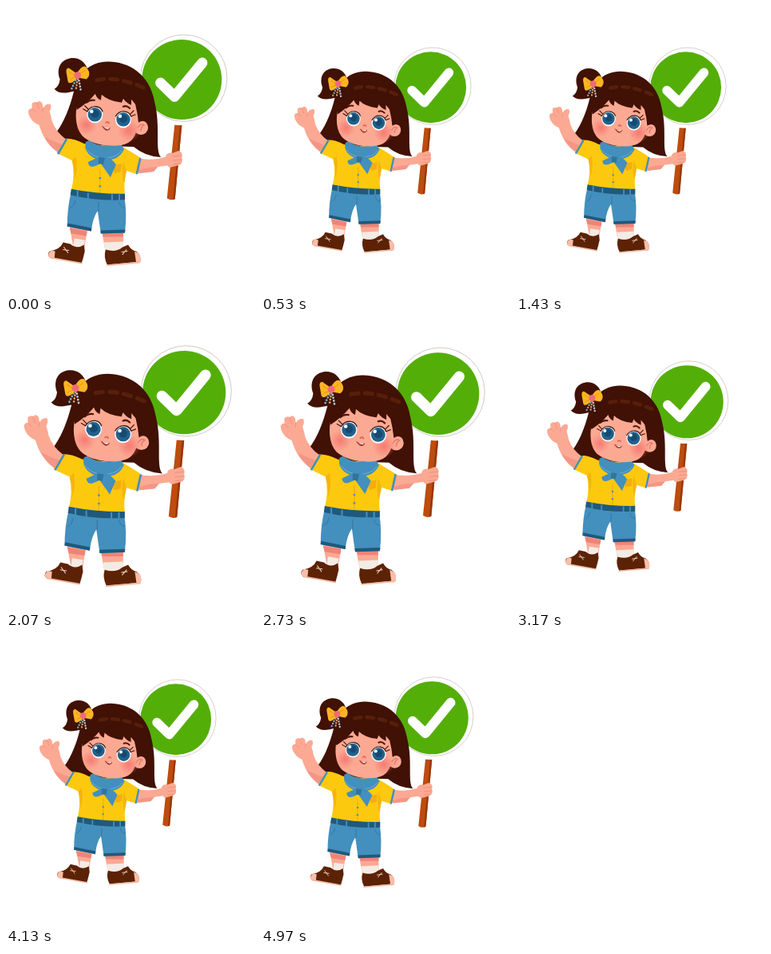
Recreate the animation shown at these times as an HTML page. Size 312x360 px, loop 5.01 s.

```html
<!DOCTYPE html>
<html lang="en">
<head>
<meta charset="utf-8">
<title>Girl with a check sign</title>
<style>
html, body { margin: 0; width: 100%; height: 100%; overflow: hidden; background: #fff; }
svg { display: block; width: 312px; height: 360px; }
.hair { fill: #401104; }
.skin { fill: #fba993; }
.shade { fill: #ee8478; }
.shirt { fill: #fdc90f; }
.fold { fill: #f5b40c; }
.blue { fill: #438fbd; }
.navy { fill: #1f597c; }
.shoe { fill: #5c2206; }
.line { fill: none; stroke-linecap: round; stroke-linejoin: round; }
</style>
</head>
<body>
<svg viewBox="0 0 312 360">
<defs>
  <radialGradient id="blush">
    <stop offset="0" stop-color="#f4736c" stop-opacity=".85"/>
    <stop offset="1" stop-color="#f4736c" stop-opacity="0"/>
  </radialGradient>
  <g id="eye">
    <ellipse rx="10" ry="10.5" fill="#fff"/>
    <circle r="8.7" fill="#22618c"/>
    <circle cy="-1" r="5" fill="#164a70"/>
    <circle cx="-4" cy="-4" r="2.2" fill="#fff"/>
    <path class="line" d="M-9.500-4Q-5-11 2-10Q8-9 9.500-4" stroke="#401104" stroke-width="1.300"/>
  </g>
</defs>
<g id="girl">
  <!-- sign -->
  <circle cx="222.500" cy="90.500" r="54" fill="#fff" stroke="#b5a79f" stroke-width=".6"/>
  <circle cx="220" cy="92.300" r="49.800" fill="#54ae08"/>
  <path class="line" d="M193.500 96.500 211 113.500 245.500 71.500" stroke="#fff" stroke-width="13"/>
  <path d="M211 149 220 149.500 211.500 241Q206 243.500 201.500 240Z" fill="#bd4c0f"/>
  <path d="M217.500 149.500h2.500l-8.500 91.500-2.500 1Z" fill="#97370b"/>

  <!-- back hair -->
  <path class="hair" d="M86 104C80 130 70 152 59 163Q70 171 94 174L160 176Q174 188 194 189C186 180 194 152 186 120C180 85 153 70 128 70C105 70 90 86 86 104Z"/>

  <!-- raised arm -->
  <path class="skin" d="M70 186C54 177 46 163 42 149C34 146 28 138 28.500 131Q31 127 33 129L33 122Q37 119 39 121Q43 117 46 122L47 128Q50 122 56 123Q58 127 55 132Q57 138 58 144Q63 158 76 167Z"/>
  <path class="line" d="M33 129 38 133M39 121 42 129M47 128 46 133" stroke="#f08c7d" stroke-width=".8"/>
  <path class="shade" d="M70 186C60 180 53 172 49 164Q62 170 73 174Z" opacity=".5"/>

  <!-- holding arm -->
  <path class="skin" d="M164 190Q184 194 202 188L204 199 190 201 185 207 166 209Z"/>
  <path class="shade" d="M166 209 185 207 190 201 178 202 166 205Z" opacity=".5"/>
  <path class="skin" d="M200 187Q203 182 208 184L216 181Q222 183 220 190Q222 197 216 199L205 202Q199 200 200 187Z"/>
  <path class="line" d="M209 188 219 187M209 193 220 192M209 198 217 197" stroke="#ea8a78" stroke-width=".8"/>

  <!-- legs and shoes -->
  <path class="skin" d="M80 275 102 279 98 305 85 303ZM120 280 147 280 147 308 125 308Z"/>
  <path class="shade" d="M80 277 102 281 101 287 82 284ZM121 283H147V288H122Z"/>
  <path d="M86 290 99 292 97 306 84 303ZM123 295 147 294 148 310 125 309Z" fill="#f4ebe4"/>
  <path class="shoe" d="M72 295 81 297Q89 304 98 298L99 306Q97 315 95 321L56 314Q51 311 55 306Q68 304 72 295Z"/>
  <path class="shoe" d="M125 304Q138 308 146 301L153 298Q157 305 163 306Q170 311 168 319L127 323Q122 313 125 304Z"/>
  <path d="M57 305 62 306 61 315 55 314Q51 310 57 305ZM161 306 167 309Q170 315 168 320L163 320Z" fill="#f9bda8"/>
  <path class="line" d="M56 314 95 321M127 323.500 167 320" stroke="#f3b9a0" stroke-width="1.800"/>
  <path class="line" d="M72 304 79 305M73 301 78 308M145 307 152 306M146 310 151 304" stroke="#f3d6c4" stroke-width="1"/>

  <!-- shorts -->
  <path class="blue" d="M82 232 148 236Q152 259 149 283L119 284 115 256Q109 264 107 281L77 275Q77 252 82 232Z"/>
  <path class="navy" d="M77.500 271 107.500 277 107 281 77 275ZM118.500 280 149.500 279 149 283 119 284Z"/>
  <path class="line" d="M116 245V256M87 243Q86 250 81 252M142 245Q143 251 149 252" stroke="#32719d" stroke-width=".8"/>

  <!-- shirt -->
  <path class="shirt" d="M98 172Q84 165 75 166L64 184 83 193Q87 212 82 230Q115 237 149 236Q147 218 151 206L164 210 169 190Q158 183 148 177Z"/>
  <path class="fold" d="M83 193 88 188Q91 204 86 218Q87 205 83 193ZM151 206 147 194Q144 210 148 222Z"/>
  <path class="line" d="M76 167 66 184M168 191 164 209" stroke="#438fbd" stroke-width="2.600"/>
  <path class="line" d="M118 204V234" stroke="#e3a30a" stroke-width=".8"/>
  <path d="M134 199 145 197 144 207 136 209Z" fill="#f3ad10"/>
  <g class="blue"><circle cx="118" cy="215" r="1.300"/><circle cx="118" cy="225" r="1.300"/></g>
  <path class="navy" d="M82 228.500Q115 235 149 234.500L149 242Q114 244 81 236Z"/>
  <path class="line" d="M90 231V238M103 234V240M133 236V242M142 236V242" stroke="#438fbd" stroke-width="2"/>

  <!-- collar and scarf -->
  <path class="blue" d="M100 170Q97 184 113 191Q140 197 148 179L144 172Q122 180 104 168Z"/>
  <path class="line" d="M102 180Q108 188 120 190Q138 191 145 181" stroke="#82b5cf" stroke-width=".8"/>
  <path class="blue" d="M118 188 103 195Q104 203 112 200L119 197 131 214 138 198Q132 190 124 188Z"/>
  <path class="navy" d="M116 189 124 190 122 198 116 197Z" opacity=".5"/>

  <!-- face -->
  <circle class="skin" cx="169" cy="152" r="9"/>
  <path class="line" d="M165 152Q169 146 173 149Q169 151 169 156" stroke="#e5786b" stroke-width="1.400"/>
  <path class="skin" d="M92 114C85 134 87 156 99 165C112 175 140 178 153 171C164 165 168 148 166 112L130 94Z"/>
  <circle cx="101" cy="149" r="13" fill="url(#blush)"/>
  <circle cx="154" cy="156" r="14" fill="url(#blush)"/>
  <use href="#eye" x="111.500" y="136"/>
  <use href="#eye" x="147" y="142"/>
  <path class="line" d="M102 132 97 129M103 129 99 125M157 138 162 136M156 135 160 131" stroke="#401104" stroke-width="1.200"/>
  <path class="line" d="M101 121Q105 117 111 118M147 126Q151 124 155 128" stroke="#4d1808" stroke-width="2.200"/>
  <path class="line" d="M125.500 146Q127.500 144 129 146.500" stroke="#e5655a" stroke-width="2"/>
  <path d="M120 150Q125 153 131 152Q129 157 125 155.500Q122 154 120 150Z" fill="#a63a30"/>
  <path d="M122 151Q126 153 130 152L128 154Q125 154 122 151Z" fill="#fff"/>

  <!-- fringe -->
  <path class="hair" d="M89 130C85 109 95 73 129 71C164 72 188 95 185 142L177 146Q171 142 166 146Q165 135 162 123L157 117 157 124Q150 121 147 116L145 121Q128 119 120 111L119 118Q114 116 112 110Q103 121 89 130Z"/>
  <path class="line" d="M114 93Q140 87 178 105" stroke="#5f240c" stroke-width="5" stroke-dasharray="9 8" opacity=".75"/>

  <!-- bun and bow -->
  <path class="hair" d="M104 85C101 69 90 64 80 66C66 69 64 82 68 92Q67 101 61 104Q67 111 80 108Q100 106 104 85Z"/>
  <g class="line" stroke-width="2.600" stroke-dasharray=".1 3.600">
    <path d="M89 90 82 105" stroke="#72b6d5"/>
    <path d="M91 90 94 106" stroke="#b9cfdd"/>
    <path d="M90 92 88 104" stroke="#d9a06a"/>
  </g>
  <path d="M89 85 79 78Q75 78 76 84L78 95Q81 100 90 90L101 92Q106 88 104 82L101 77Q96 73 89 85Z" fill="#fcb522"/>
  <path class="line" d="M80 83 86 87M81 92 87 89M93 85 99 81" stroke="#e08b16" stroke-width=".8"/>
  <circle cx="90" cy="87" r="4.300" fill="#ee6a7b"/>
</g>
</svg>
<script>
const girl = document.getElementById("girl");
const LOOP = 5010, STEP = 100 / 3, BEAT = 27, PEAK = 4.8;
const start = performance.now();

function draw() {
  const t = (performance.now() - start) % LOOP;
  const step = Math.min(149, Math.floor((t + 5) / STEP));
  // Rebounding pulse: sharp at the largest size, smooth at the smallest.
  const width = 283 - 64 * Math.abs(Math.sin(Math.PI * (step - PEAK) / BEAT));
  girl.setAttribute("transform", `translate(152.4 180.2) scale(${width / 248}) translate(-152.4 -180.2)`);
  requestAnimationFrame(draw);
}
draw();
</script>
</body>
</html>
```
